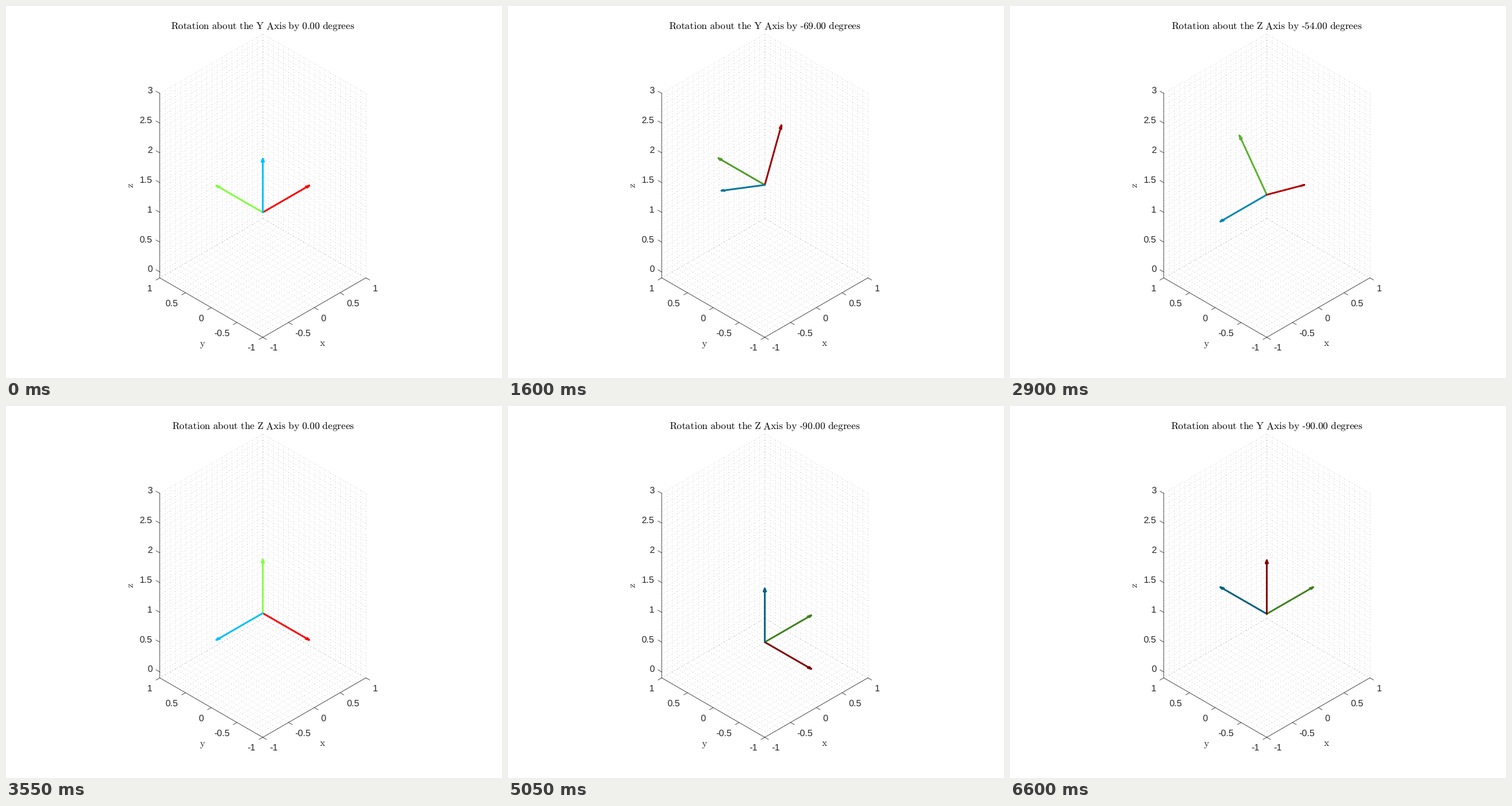
A matplotlib script that plays this animation: 864x648 px, repeating every 6650 ms.

```python
import numpy as np
import matplotlib.pyplot as plt
from matplotlib.animation import FuncAnimation
from matplotlib.collections import LineCollection

W, H, DPI = 864, 648, 100
PX = 72 / DPI                      # points per pixel
INK = "#262626"
CX, CY = 447.3, 463.2              # screen position of (0, 0, 0)
UX, UY, UZ = 89.75, 51.8, 103.7    # isometric pixels per unit
LO, HI, ZLO, ZHI = -1, 1, -0.1, 3

STEPS, HOLD, FRAMES = 31, 9, 133   # poses per turn, extra frames on the first pose
TURNS = "YZXY"
NAMES = "YZZY"
COLORS = np.array([[1, 0, 0], [0.5, 1, 0.25], [0, 0.75, 1]])
LENGTH, HEAD, HALF = 0.9, 0.05, 0.017

plt.rcParams["font.family"] = "Liberation Sans"
plt.rcParams["mathtext.fontset"] = "cm"
plt.rcParams["text.hinting"] = "none"

fig = plt.figure(figsize=(W / DPI, H / DPI), dpi=DPI, facecolor="white")
ax = fig.add_axes([0, 0, 1, 1])
ax.set_xlim(0, W)
ax.set_ylim(H, 0)
ax.axis("off")


def project(p):
    x, y, z = np.moveaxis(np.asarray(p, float), -1, 0)
    return np.stack([CX + UX * (x - y), CY - UY * (x + y) - UZ * z], -1)


def rotation(axis, deg):
    c, s = np.cos(np.radians(deg)), np.sin(np.radians(deg))
    if axis == "X":
        return np.array([[1, 0, 0], [0, c, -s], [0, s, c]])
    if axis == "Y":
        return np.array([[c, 0, s], [0, 1, 0], [-s, 0, c]])
    return np.array([[c, -s, 0], [s, c, 0], [0, 0, 1]])


def draw_grid():
    lines = []
    for v in np.linspace(LO, HI, 21):
        lines += [[(v, LO, ZLO), (v, HI, ZLO)], [(LO, v, ZLO), (HI, v, ZLO)],
                  [(v, HI, ZLO), (v, HI, ZHI)], [(HI, v, ZLO), (HI, v, ZHI)]]
    for v in np.linspace(ZLO, ZHI, 32):
        lines += [[(LO, HI, v), (HI, HI, v)], [(HI, LO, v), (HI, HI, v)]]
    ax.add_collection(LineCollection(project(lines), colors=INK, alpha=0.25,
                                     linewidths=PX, linestyles=[(0, (1, 4))], zorder=1))


def tick(p, step, label, offset, ha):
    x, y = project(p)
    ax.plot([x, x + step[0]], [y, y + step[1]], color=INK, lw=0.8 * PX, zorder=2)
    ax.text(x + offset[0], y + offset[1] + 5.8, label, color=INK, fontsize=16 * PX,
            ha=ha, va="baseline")


def draw_axes():
    frame = project([(LO, HI, ZHI), (LO, HI, ZLO), (LO, LO, ZLO), (HI, LO, ZLO)])
    ax.plot(*frame.T, color=INK, lw=0.8 * PX, zorder=2)
    for v in np.arange(-1, 1.1, 0.5):
        tick((v, LO, ZLO), (6.5, 3.7), f"{v:g}", (11.5, 17.3), "left")
        tick((LO, v, ZLO), (-6.5, 3.7), f"{v:g}", (-13, 17.3), "right")
    for v in np.arange(0, 3.1, 0.5):
        tick((LO, HI, v), (-6.5, -3.7), f"{v:g}", (-13, -5.7), "right")
    style = dict(color=INK, fontsize=17.2 * PX, ha="center")
    ax.text(551, 592, r"$\mathrm{x}$", va="baseline", **style)
    ax.text(342.5, 592, r"$\mathrm{y}$", va="baseline", **style)
    ax.text(217.5, 312.5, r"$\mathrm{z}$", va="center", rotation=90, **style)


def arrow_points(base, d):
    side = np.array([d[1], -d[0], 0])
    if np.linalg.norm(side) < 1e-6:
        side = np.array([1.0, -1.0, 0])
    side = side / np.linalg.norm(side) * HALF
    tip = base + LENGTH * d
    back = tip - HEAD * d
    return project([base, tip, back + side, back - side, tip])


draw_grid()
draw_axes()
title = ax.text(447.5, 40, "", color="black", fontsize=17.25 * PX, ha="center", va="baseline")
arrows = [ax.plot([], [], lw=3 * PX, solid_capstyle="round", solid_joinstyle="round")[0]
          for _ in COLORS]


def update(i):
    k = max(0, i - HOLD)
    turn, j = divmod(k, STEPS)
    angle = -3 * j
    pose = np.eye(3)
    for axis in TURNS[:turn]:
        pose = pose @ rotation(axis, -90)
    pose = pose @ rotation(TURNS[turn], angle)

    phase = k / (STEPS * len(TURNS))
    swing = 2 * np.pi * phase + 0.027 * np.sin(np.pi * phase) ** 2
    base = np.array([0, 0, 1 + 0.5 * np.sin(swing)])
    shade = 1 - 0.5 * j / (STEPS - 1)
    for line, d, color in zip(arrows, pose.T, COLORS):
        line.set_data(*arrow_points(base, d).T)
        line.set_color(color * shade)
        line.set_zorder(5 + d @ (-1, -1, 1))   # nearer arrows on top

    number = f"{angle:.2f}".replace("-", "\u2010")
    words = f"Rotation about the {NAMES[turn]} Axis by {number} degrees"
    title.set_text(r"$\mathrm{%s}$" % words.replace(" ", r"\ "))
    return [*arrows, title]


anim = FuncAnimation(fig, update, frames=FRAMES, interval=50, repeat=True, repeat_delay=0)
plt.show()
```
